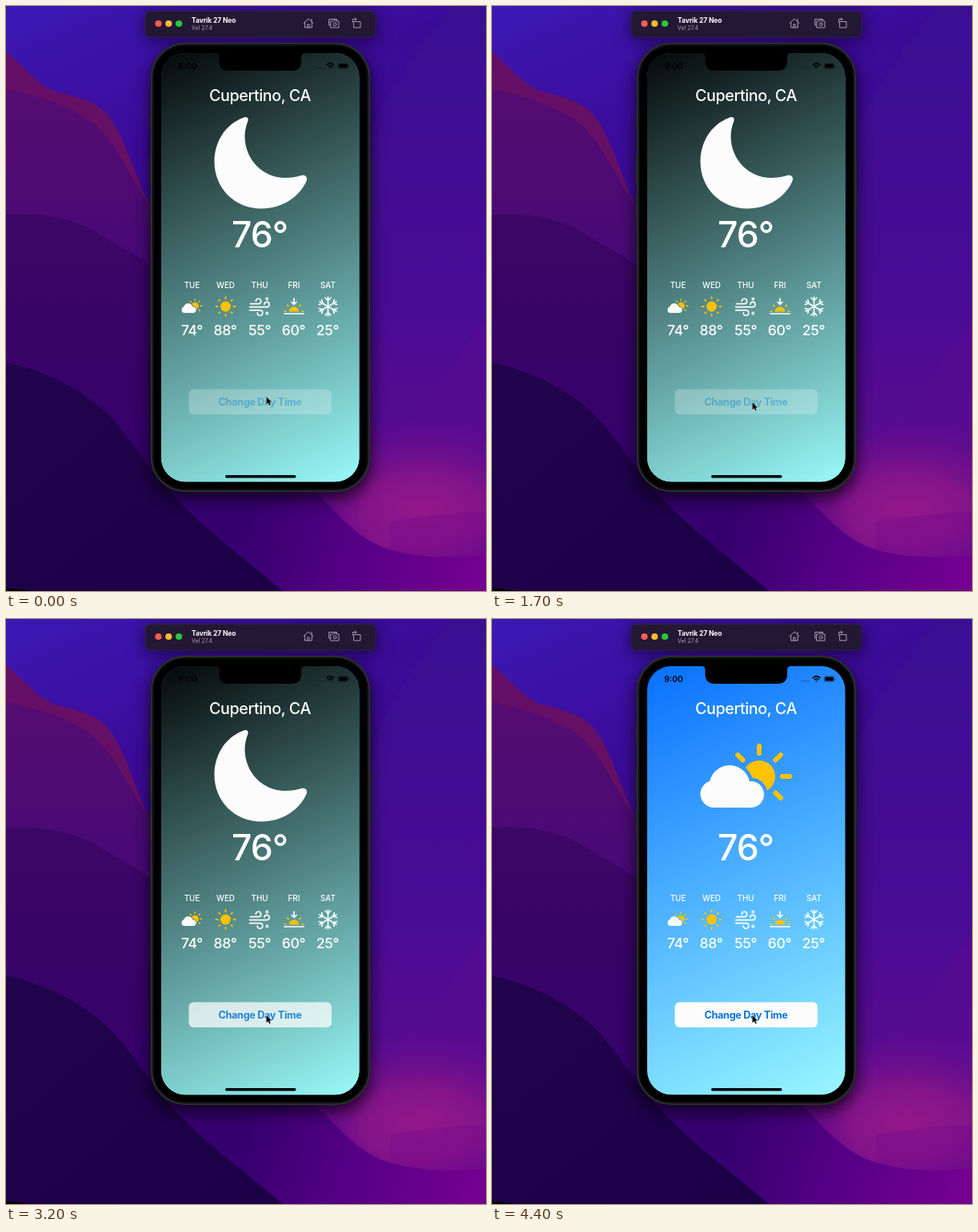
These frames come from a looping animation (600x732 px, 4500 ms). An HTML page:

```html
<!DOCTYPE html>
<html lang="en">
<head>
<meta charset="utf-8">
<title>Weather</title>
<style>
  html, body { margin: 0; width: 100%; height: 100%; overflow: hidden; background: #35008a; }
  svg { display: block; width: 600px; height: 732px; font-family: Inter, Roboto, sans-serif; }
  .mid { text-anchor: middle; }
  .white { fill: #fff; font-weight: 500; }
  .line { fill: none; stroke-linecap: round; stroke-linejoin: round; }

  .night { animation: night 4.5s step-end infinite; }
  .day { animation: day 4.5s step-end infinite; }
  .button { animation: press 4.5s step-end infinite; }
  .cursor { animation: drift 4.5s ease-out infinite; }

  @keyframes night {
    0%, 37.77%, 66.66% { opacity: 1; }
    20%, 53.33%, 80%, 100% { opacity: 0; }
  }
  @keyframes day {
    0%, 37.77%, 66.66% { opacity: 0; }
    20%, 53.33%, 80%, 100% { opacity: 1; }
  }
  /* held down, then released and fading back in */
  @keyframes press {
    15.55%, 33.33%, 48.88%, 62.22%, 75.55% { opacity: .2; }
    0%, 20%, 37.77%, 53.33%, 66.66%, 80% { opacity: .24; }
    2.22%, 22.22%, 40%, 55.55%, 68.88%, 82.22% { opacity: .5; }
    4.44%, 24.44%, 42.22%, 57.77%, 71.11%, 84.44% { opacity: .75; }
    6.66%, 26.66%, 44.44%, 60%, 73.33%, 86.66% { opacity: .92; }
    8.88%, 28.88%, 46.66%, 88.88%, 100% { opacity: 1; }
  }
  @keyframes drift {
    0% { transform: translateY(-7px); }
    6.66%, 100% { transform: none; }
  }
</style>
</head>
<body>
<svg viewBox="0 0 600 732">
  <defs>
    <linearGradient id="base" x1="0" y1="0" x2=".35" y2="1">
      <stop offset="0" stop-color="#3b18b4"/>
      <stop offset=".3" stop-color="#3b0b98"/>
      <stop offset=".65" stop-color="#41078c"/>
      <stop offset="1" stop-color="#4a0084"/>
    </linearGradient>
    <linearGradient id="ridge" x1="0" y1="0" x2="1" y2="1">
      <stop offset="0" stop-color="#640f66"/>
      <stop offset="1" stop-color="#641062"/>
    </linearGradient>
    <linearGradient id="hill" x1="0" y1="0" x2="0" y2="1">
      <stop offset="0" stop-color="#550c70"/>
      <stop offset="1" stop-color="#3e087a"/>
    </linearGradient>
    <linearGradient id="slope" x1="0" y1="0" x2="0" y2="1">
      <stop offset="0" stop-color="#3d0666"/>
      <stop offset="1" stop-color="#30006c"/>
    </linearGradient>
    <linearGradient id="valley" x1="0" y1="0" x2="1" y2="1">
      <stop offset="0" stop-color="#22044c"/>
      <stop offset="1" stop-color="#1b0046"/>
    </linearGradient>
    <linearGradient id="east" x1="0" y1="0" x2="0" y2="1">
      <stop offset="0" stop-color="#390f92"/>
      <stop offset=".5" stop-color="#480b94"/>
      <stop offset=".75" stop-color="#580b90"/>
      <stop offset="1" stop-color="#640a8c"/>
    </linearGradient>
    <linearGradient id="floor" gradientUnits="userSpaceOnUse" x1="300" y1="640" x2="590" y2="720">
      <stop offset="0" stop-color="#35006e"/>
      <stop offset=".45" stop-color="#540084"/>
      <stop offset="1" stop-color="#740090"/>
    </linearGradient>
    <linearGradient id="daySky" gradientUnits="userSpaceOnUse" x1="194" y1="59" x2="442" y2="596">
      <stop offset="0" stop-color="#0870ff"/>
      <stop offset="1" stop-color="#99f7ff"/>
    </linearGradient>
    <linearGradient id="nightSky" gradientUnits="userSpaceOnUse" x1="194" y1="59" x2="442" y2="596">
      <stop offset="0" stop-color="#050808"/>
      <stop offset="1" stop-color="#99faf9"/>
    </linearGradient>
    <radialGradient id="glow">
      <stop offset="0" stop-color="#94188a"/>
      <stop offset=".4" stop-color="#8a1688" stop-opacity=".85"/>
      <stop offset="1" stop-color="#640c90" stop-opacity="0"/>
    </radialGradient>
    <filter id="soft" x="-20%" y="-60%" width="140%" height="220%">
      <feGaussianBlur stdDeviation="10"/>
    </filter>

    <g id="cloud">
      <circle cx="277.5" cy="219" r="17"/>
      <circle cx="297" cy="208.5" r="25.5"/>
      <circle cx="323.5" cy="219.5" r="16.5"/>
      <path d="M277 212H323V236H277Z"/>
    </g>
    <mask id="gap" maskUnits="userSpaceOnUse" x="250" y="145" width="140" height="110">
      <path d="M250 145H390V255H250Z" fill="#fff"/>
      <use href="#cloud" stroke="#000" stroke-width="9"/>
    </mask>
    <g id="cloudSun">
      <circle cx="334" cy="197" r="20" fill="#fec200" mask="url(#gap)"/>
      <g transform="translate(334 197)" class="line" stroke="#fec200" stroke-width="6">
        <path id="ray" d="M29 0H38"/>
        <use href="#ray" transform="rotate(45)"/>
        <use href="#ray" transform="rotate(-45)"/>
        <use href="#ray" transform="rotate(-90)"/>
        <use href="#ray" transform="rotate(-135)"/>
      </g>
      <use href="#cloud" fill="#fcfcfc"/>
    </g>
    <path id="beam" d="M10 0H11.8"/>
    <path id="arm" d="M0 0V-12M-3.5 -11L0 -7.5L3.5 -11"/>
    <path id="flake" d="M0 -2V2M-1.7 -1L1.7 1M-1.7 1L1.7 -1" stroke-width="1"/>
  </defs>

  <!-- wallpaper -->
  <path d="M0 0H600V732H0Z" fill="url(#base)"/>
  <path d="M600 0H556C525 45 478 95 452 172V732H600Z" fill="url(#east)"/>
  <path d="M600 392C560 440 545 500 440 575V732H600Z" fill="#5c0c90" opacity=".35"/>
  <ellipse cx="520" cy="632" rx="190" ry="115" fill="url(#glow)"/>
  <path d="M480 645C520 638 560 634 600 633V732H480Z" fill="#74088e" opacity=".35"/>
  <path d="M0 57C22 75 38 98 62 107C88 114 114 118 130 140C151 169 160 211 182 255V400H0Z" fill="url(#ridge)"/>
  <path d="M0 104C48 113 88 128 113 150C142 178 157 218 184 257V460H0Z" fill="url(#hill)"/>
  <path d="M0 261C48 258 87 267 113 283C142 302 161 308 190 332V732H0Z" fill="url(#slope)"/>
  <path d="M188 600H377C413 630 430 661 473 678C517 693 561 690 600 688V732H188Z" fill="url(#floor)"/>
  <path d="M0 446C47 456 91 478 122 506C153 534 171 570 203 606C242 650 291 686 346 732H0Z" fill="url(#valley)"/>
  <path d="M0 728L34 732H0Z" fill="#050008"/>

  <!-- simulator bar -->
  <rect x="172" y="8" width="292" height="36" rx="8" opacity=".5" filter="url(#soft)"/>
  <rect x="174" y="6.5" width="288" height="32.5" rx="6" fill="#231833" stroke="#34264a" stroke-width=".7"/>
  <circle cx="190.5" cy="22" r="4.1" fill="#fb5d56"/>
  <circle cx="203.3" cy="22" r="4.1" fill="#fdbb2d"/>
  <circle cx="216.1" cy="22" r="4.1" fill="#28c63f"/>
  <text x="232" y="21" font-size="8.5" font-weight="700" fill="#fff" letter-spacing="-.1">Tavrik 27 Neo</text>
  <text x="232" y="30" font-size="7" fill="#a69fb1">Vel 27.4</text>
  <g class="line" stroke="#a69db2">
    <path d="M372 21.5L378 16L384 21.5M373.6 20.5V27H382.4V20.5M376.8 27V23H379.2V27M382 16.5V19"/>
    <path d="M405.5 24H403.7V16.5H413.5V18M406 19H408.5L409.3 18H412.5L413.3 19H416V27H406Z"/>
    <circle cx="411" cy="22.8" r="2"/>
    <path d="M435 19.5H443V27H435ZM433.5 20V16.5H438M436.3 14.8L438 16.5L436.3 18.2"/>
  </g>

  <!-- phone -->
  <rect x="180" y="54" width="276" height="562" rx="42" opacity=".7" filter="url(#soft)"/>
  <path d="M180.6 137V154M180.6 188V224M180.6 238V275M455.4 192V256" stroke="#1d201f" stroke-width="2"/>
  <rect x="182" y="47" width="272" height="560" rx="42" stroke="#292d2b" stroke-width="2.5"/>
  <rect x="184.5" y="49.5" width="267" height="555" rx="39.5" stroke="#111412"/>
  <rect x="194" y="59" width="247.5" height="536.3" rx="30" fill="url(#daySky)"/>
  <rect class="night" x="194" y="59" width="247.5" height="536.3" rx="30" fill="url(#nightSky)"/>
  <path d="M262 58V59Q266.5 59 266.5 64V69Q266.5 81 278.5 81H357Q369 81 369 69V64Q369 59 373.5 59V58Z"/>

  <!-- status row -->
  <text x="227" y="78.5" class="mid" font-size="10.3" font-weight="600">9:00</text>
  <path d="M387 77.5H397" stroke="#000" stroke-opacity=".4" stroke-width="1.5" stroke-dasharray="1.5 1.3"/>
  <path class="line" stroke="#000" stroke-width="1.6" d="M401.2 73.6Q405.5 69.8 409.8 73.6M403.1 75.8Q405.5 73.7 407.9 75.8M405.5 77.6V77.7"/>
  <rect x="415" y="71.5" width="13" height="7" rx="2" fill="none" stroke="#000" stroke-opacity=".4" stroke-width=".7"/>
  <rect x="416" y="72.5" width="11" height="5" rx="1.2"/>
  <path d="M429.3 74V76" stroke="#000" stroke-opacity=".5"/>

  <!-- current weather -->
  <text x="317.5" y="118.5" class="mid white" font-size="19.7" letter-spacing="-.42">Cupertino, CA</text>
  <use class="day" href="#cloudSun"/>
  <path class="night" fill="#fcfcfc" d="M296 140C273 149 260.5 171 260.5 195C260.5 228 286 253.5 319 253.5C345 253.5 367 239 375.5 219C377.5 214 374 210.5 369 212C363 214 357 215 349 215C321 215 298.5 192 298.5 163C298.5 157 300 150 302 145C304 140 301 137.5 296 140Z"/>
  <text x="317" y="302.3" class="mid white" font-size="44.5" letter-spacing="-1">76°</text>

  <!-- forecast -->
  <g class="mid white" font-size="9.9">
    <text x="232.5" y="353">TUE</text>
    <text x="274.5" y="353">WED</text>
    <text x="317" y="353">THU</text>
    <text x="360" y="353">FRI</text>
    <text x="402.5" y="353">SAT</text>
  </g>
  <use href="#cloudSun" transform="translate(160.7 330.7) scale(.226)"/>
  <g transform="translate(274.5 376)" class="line" stroke="#fec200" stroke-width="1.9">
    <circle r="6.4" fill="#fec200" stroke="none"/>
    <use href="#beam"/>
    <use href="#beam" transform="rotate(45)"/>
    <use href="#beam" transform="rotate(90)"/>
    <use href="#beam" transform="rotate(135)"/>
    <use href="#beam" transform="rotate(180)"/>
    <use href="#beam" transform="rotate(225)"/>
    <use href="#beam" transform="rotate(270)"/>
    <use href="#beam" transform="rotate(315)"/>
  </g>
  <g class="line" stroke="#fff" stroke-width="1.6">
    <path d="M305.5 372.6H315.5A3.2 3.2 0 1 0 312.3 369.4M304.5 376.6H326A3.1 3.1 0 1 0 322.9 373.5M304.5 380.6H317.5A3.3 3.3 0 1 1 314.2 383.9"/>
    <use href="#flake" x="326.3" y="366.5"/>
    <use href="#flake" x="326.3" y="384.5"/>
  </g>
  <g transform="translate(360 382.5)" class="line" stroke="#fec200" stroke-width="1.7">
    <path d="M-6.3 0A6.3 6.3 0 0 1 6.3 0Z" fill="#fec200" stroke="none"/>
    <use href="#beam" transform="rotate(-3)"/>
    <use href="#beam" transform="rotate(-45)"/>
    <use href="#beam" transform="rotate(-135)"/>
    <use href="#beam" transform="rotate(-177)"/>
    <path d="M-12 2.5H12M0 -16.5V-9.5M-3 -12L0 -9.2L3 -12" stroke="#fff"/>
  </g>
  <g transform="translate(402.5 376)" class="line" stroke="#fff" stroke-width="1.6">
    <use href="#arm"/>
    <use href="#arm" transform="rotate(60)"/>
    <use href="#arm" transform="rotate(120)"/>
    <use href="#arm" transform="rotate(180)"/>
    <use href="#arm" transform="rotate(240)"/>
    <use href="#arm" transform="rotate(300)"/>
  </g>
  <g class="mid white" font-size="17.6" letter-spacing="-.35">
    <text x="232.5" y="412">74°</text>
    <text x="274" y="412">88°</text>
    <text x="317" y="412">55°</text>
    <text x="359.5" y="412">60°</text>
    <text x="402" y="412">25°</text>
  </g>

  <g class="button">
    <rect x="228.5" y="479.5" width="178.5" height="31.5" rx="6" fill="#fcfcfc"/>
    <text x="317.5" y="500" class="mid" font-size="12.7" font-weight="700" letter-spacing="-.34" fill="#0b74de">Change Day Time</text>
  </g>
  <rect x="274" y="587" width="88.5" height="3.4" rx="1.7"/>
  <path class="cursor" d="M325.5 496V505.3L327.7 503.3L329.2 506.4L330.7 505.7L329.3 502.6H332Z" stroke="#fff" stroke-width=".8" stroke-opacity=".85" paint-order="stroke"/>
</svg>
</body>
</html>
```
